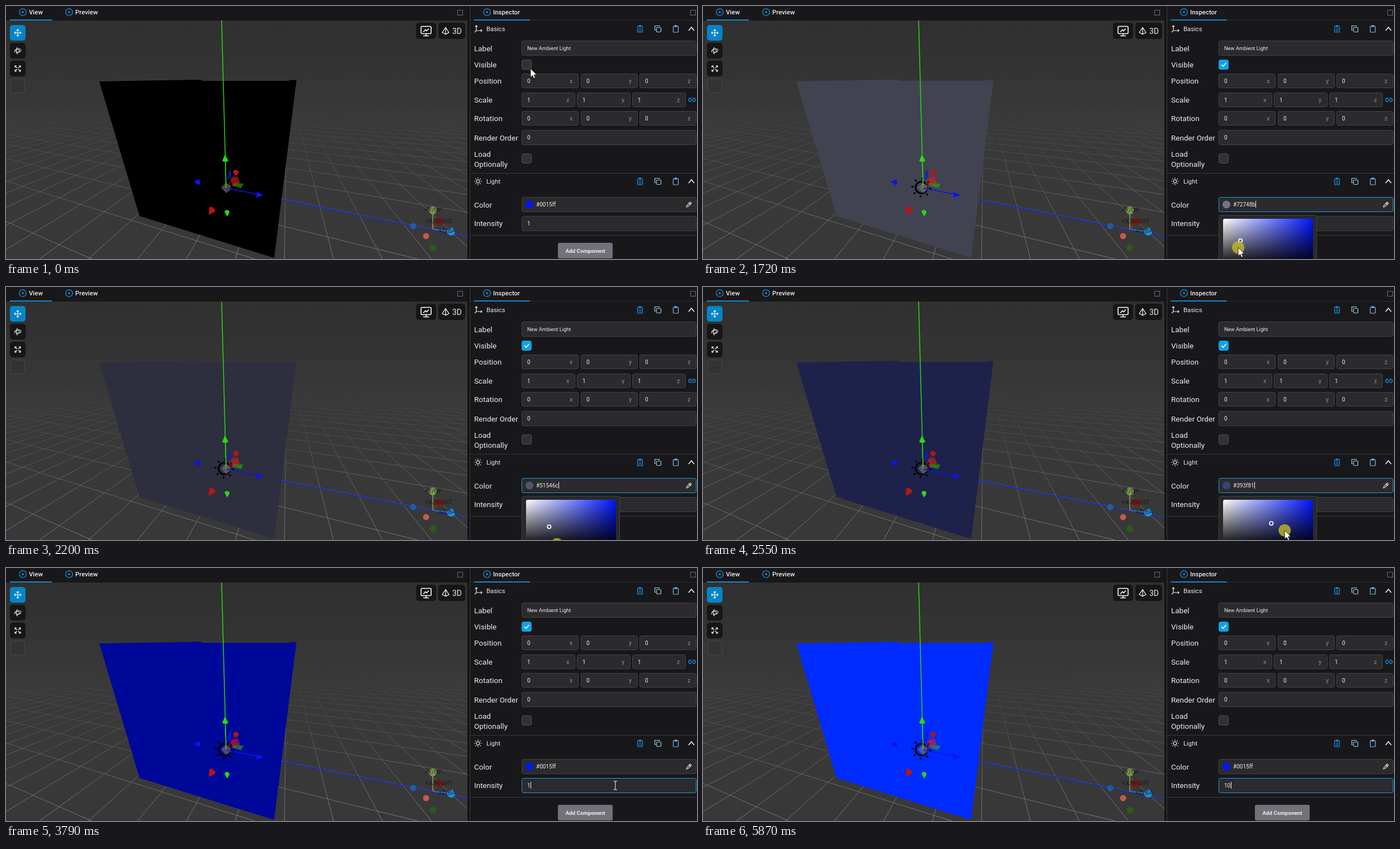
An HTML page for the animation above (5.94 s loop, 1237 by 453 pixels).

```html
<!DOCTYPE html>
<html lang="en">
<head>
<meta charset="utf-8">
<title>Ambient light inspector</title>
<style>
  html, body { margin: 0; width: 100%; height: 100%; overflow: hidden; background: #18181b; }
  svg { display: block; width: 1237px; height: 453px; }
  text { font-family: Roboto, Inter, sans-serif; fill: #ececee; }
</style>
</head>
<body>
<svg id="stage" viewBox="0 0 1237 453" fill="none"></svg>
<script>
const LOOP = 5940;
const stage = document.getElementById('stage');

// ---- drawing helpers -------------------------------------------------
const rect = (x, y, w, h, fill, r = 0, more = '') =>
  `<rect x="${x}" y="${y}" width="${w}" height="${h}" rx="${r}" fill="${fill}" ${more}/>`;
const text = (x, y, s, size, more = '') =>
  `<text x="${x}" y="${y}" font-size="${size}" ${more}>${s}</text>`;
const path = (d, stroke, w = 1, more = '') =>
  `<path d="${d}" stroke="${stroke}" stroke-width="${w}" ${more}/>`;
const shape = (points, fill, more = '') => `<polygon points="${points}" fill="${fill}" ${more}/>`;
const dot = (x, y, r, fill, more = '') => `<circle cx="${x}" cy="${y}" r="${r}" fill="${fill}" ${more}/>`;
const at = (x, y, s) => `<g transform="translate(${x} ${y})">${s}</g>`;

// ---- viewport --------------------------------------------------------
// Ground plane seen in perspective: an origin and two vanishing points.
const ORIGIN = [394, 326], VX = [503, 131], VZ = [-581, 131];
const STEP_X = 0.163, STEP_Z = 0.049;

function ground(u, w) {
  const a = u * STEP_X, b = w * STEP_Z, d = 1 + a + b;
  return [0, 1].map(i => ((ORIGIN[i] + a * VX[i] + b * VZ[i]) / d).toFixed(1)).join(' ');
}

function grid() {
  let d = '';
  for (let u = -8; u <= 50; u++) {
    d += `M${ground(u, (0.05 - 1 - u * STEP_X) / STEP_Z)}L${ground(u, 4000)}`;
  }
  for (let w = -110; w <= 90; w++) {
    d += `M${ground((0.05 - 1 - w * STEP_Z) / STEP_X, w)}L${ground(2000, w)}`;
  }
  return path(d, '#8a8a8a', 1, 'mask="url(#fade)"');
}

function sun() {
  let rays = '';
  for (let i = 0; i < 8; i++) {
    const c = Math.cos(i * Math.PI / 4 + 0.1), s = Math.sin(i * Math.PI / 4 + 0.1);
    rays += `M${14 * c} ${14 * s}L${18 * c} ${18 * s}`;
  }
  return at(391, 325, dot(0, 0, 10.5, 'none', 'stroke="#050505" stroke-width="3.2"') + path(rays, '#050505', 3));
}

const gizmo = () =>
  path('M386 26L394 326', '#2bd80f', 1.5) +
  path('M492 346.5L826 413', '#0a1e9c', 1.4) +
  path('M492 346.5L826 413', '#1030ff', 1.4, 'stroke-dasharray="5 2"') +
  shape('385,325 393,317 402,321 402,329 394,335', '#777', 'opacity=".6"') +
  shape('398,297 403,292 403,307 397,312', '#1515e0', 'opacity=".7"') +
  shape('408,317 425,318 421,326 405,322', '#1fb312', 'opacity=".6"') +
  shape('402,309 414,305 419,316 406,323', '#e02018', 'opacity=".6"') +
  path('M394 326L412 299', '#c41414', 1.3) +
  path('M394 326L450 337', '#0a14f0', 1.5) +
  path('M394 326L392.500 277', '#2bd80f', 1.3) +
  shape('392,266 387,277 390,279 395,279 398,277', '#2bd80f') +
  shape('406,296 412,293 417,297 414,303 409,302', '#b91414') +
  shape('449,333 461,339 448,343', '#0a14f0') +
  shape('336,315 346,310 348,317 345,321', '#0a14f0') +
  shape('364,361 368,359 375,365 373,369 363,374', '#b91414') +
  shape('391,368 394,365 399,366 400,370 396,377', '#2bd80f');

const compass = () =>
  path('M764 372V400', '#84a24e', 1.6) + path('M764 400L774 387', '#9a2f28', 1.5) +
  path('M764 400L792 403', '#1e88d8', 1.6) +
  dot(729, 394, 5.5, '#205ca5') + dot(752, 412, 5.5, '#c95650') + dot(764, 433, 6, '#2c5a1c') +
  dot(764, 366, 7, '#76994a') + rect(768, 380, 14, 12, '#7c1a15', 3) + dot(797, 404, 7, '#1f8fdd') +
  [[749, 369, '+Y/UP'], [750, 389, '+X/RIGHT'], [774, 406, '+Z/BA']]
    .map(([x, y, s]) => text(x, y, s, 11, 'style="fill:#151515" opacity=".85"')).join('');

const tool = (x, y, w, h, fill, icon) => rect(x, y, w, h, fill, 5) + at(x + w / 2, y + h / 2, icon);

const tools = () =>
  tool(7, 34, 28, 28, '#0584c8', path('M-6 0H6M0-6V6M-6 0l2-2M-6 0l2 2M6 0l-2-2M6 0l-2 2M0-6l-2 2M0-6l2 2M0 6l-2-2M0 6l2-2', '#fff', 1.1)) +
  tool(7, 66, 28, 28, '#161616', dot(0, 0, 3, 'none', 'stroke="#eee"') +
    path('M-5 3C-9-2 5-6 6-1C6 2 1 3-1 3M0-6C-4-4-3 5 0 6', '#eee', 1.1)) +
  tool(7, 98, 28, 28, '#161616', path('M-5-2V-5H-2M2-5H5V-2M5 2V5H2M-2 5H-5V2M-5-5L-1-1M5-5L1-1M5 5L1 1M-5 5L-1 1', '#eee', 1.2)) +
  rect(8.5, 130.5, 25, 25, '#333', 3, 'stroke="#484848"') +
  tool(734, 30, 36, 29, '#161616', rect(-9, -8, 18, 13, 'none', 2, 'stroke="#fff" stroke-width="1.6"') +
    path('M-5 9H5M0 5V9M-5 2L-1-2L1 0L5-4', '#fff', 1.6)) +
  tool(774, 30, 48, 29, '#161616', path('M-11-6L-17 3L-11 6L-5 3ZM-11-6V6', '#fff', 1.2) +
    text(1, 5, '3D', 14));

const tab = (x, label) =>
  dot(x, 11, 6.2, 'none', 'stroke="#1c94e0" stroke-width="1.3"') + dot(x, 11, 1.8, '#1c94e0') +
  text(x + 11, 15, label, 11.4, 'font-weight="500"');
const windowBox = x => rect(x + .5, 7.5, 9, 9, 'none', 0, 'stroke="#6d6d72"');

const viewport = () =>
  rect(0, 26, 826, 106, 'url(#sky)') + rect(0, 131, 826, 322, 'url(#floor)') +
  `<g clip-path="url(#view)">${grid()}
    <polygon id="cube" points="167,135 349,132 351,134 505,134 510,132.500 520,132.500 480,451 239,376"/>
    <g id="sun">${sun()}</g>${gizmo()}${compass()}</g>` + tools() +
  tab(30, 'View') + tab(113, 'Preview') + windowBox(808) + rect(7, 24, 75, 2, '#1487cc') +
  rect(826, 0, 5, 453, '#141416') + rect(830, 0, 1, 453, '#3c3c41');

// ---- inspector -------------------------------------------------------
const fields = [];
function field(x, y, w, h, id = '') {
  fields.push([x, y, w, h]);
  return rect(x + .5, y + .5, w - 1, h - 1, '#2b2b2d', 3, `stroke="#434347" ${id && `id="${id}"`}`);
}
const label = (y, s) => text(838, y, s, 13.5);
const value = (x, y, s, id = '') => text(x, y, s, 10, id && `id="${id}"`);

function vector(y, name, v, step, w) {
  let s = label(y + 18, name);
  ['x', 'y', 'z'].forEach((axis, i) => {
    const x = 923 + Math.round(i * step);
    s += field(x, y, w, 26) + value(x + 10, y + 16.5, v) +
      text(x + w - 16, y + 16.5, axis, 11, 'style="fill:#8b8b90"');
  });
  return s;
}

const board = color => rect(-4.5, -5, 9, 11, 'none', 1, `stroke="${color}" stroke-width="1.2"`) +
  rect(-2.5, -6.5, 5, 3, color, 1);
const section = (y, name) =>
  text(860, y + 4, name, 11.3) +
  at(1135, y, board('#1d8fe6') + path('M-2.500-1H2.500M-2.500 1.500H2.500M-2.500 4H2.500', '#1d8fe6')) +
  at(1167, y, rect(-2.5, -2.5, 8, 8, 'none', 1.5, 'stroke="#9ed0ee" stroke-width="1.2"') +
    path('M-4 2.500H-5.500V-5.500H2.500V-4', '#9ed0ee', 1.2)) +
  at(1199, y, board('#78bde4')) + at(1227, y, path('M-5 3L0-3L5 3', '#f2f2f2', 1.6));

function lamp() {
  let rays = '';
  for (let i = 0; i < 8; i++) {
    const c = Math.cos(i * Math.PI / 4), s = Math.sin(i * Math.PI / 4);
    rays += `M${4.8 * c} ${4.8 * s}L${6.8 * c} ${6.8 * s}`;
  }
  return dot(0, 0, 2.8, 'none', 'stroke="#eee" stroke-width="1.2"') + path(rays, '#eee', 1.2);
}

const inspector = () =>
  tab(861, 'Inspector') + windowBox(1225) + rect(831, 25, 406, 1, '#2b2b2f') + rect(838, 24, 100, 2, '#1487cc') +
  at(845, 41, path('M-3-6V3H7M-5-4L-3-6L-1-4M5 1L7 3L5 5M-3 3L-6 6', '#eee', 1.2)) + section(41, 'Basics') +
  label(81, 'Label') + field(923, 62, 313, 27) + text(933, 79, 'New Ambient Light', 9.25) +
  label(110, 'Visible') + rect(923.5, 96.5, 17, 17, '#323234', 3, 'stroke="#515155" id="visible"') +
  path('M928 105L931 108L936.500 102', '#fff', 1.6, 'id="tick"') +
  vector(121, 'Position', '0', 105.5, 102) + vector(155, 'Scale', '1', 99, 96) +
  at(1228, 168, path('M-1-3H-3A3 3 0 0 0-3 3H-1M1-3H3A3 3 0 0 1 3 3H1M-3 0H3', '#1d8fe6', 1.3)) +
  vector(188, 'Rotation', '0', 105.5, 102) +
  label(241, 'Render Order') + field(923, 222, 313, 27) + value(933, 239, '0') +
  label(270, 'Load') + label(288, 'Optionally') + rect(923.5, 264.5, 17, 17, '#323234', 3, 'stroke="#515155"') +
  rect(831, 299, 406, 1, '#38383c') + at(845, 314, lamp()) + section(314, 'Light') +
  label(361, 'Color') + field(923, 342, 313, 27, 'colorField') + dot(937, 355.5, 7, '#0015ff', 'id="swatch"') +
  value(949, 359, '', 'hex') +
  at(1222, 356, path('M-4 4L-3 1L1-3L3-1L-1 3ZM0-4L4 0M1-3L3-5L5-3L3-1', '#e4e4e4', 1.1)) +
  label(394, 'Intensity') + field(923, 376, 313, 27, 'levelField') + value(933, 393, '', 'level') +
  rect(831, 410, 406, 1, '#38383c') + rect(988, 424, 98, 28, '#72727b', 3) +
  text(1037, 441.5, 'Add Component', 9.8, 'font-weight="700" text-anchor="middle"') +
  `<g id="picker">${rect(923.5, 374.5, 175, 90, '#29292b', 3, 'stroke="#404044"')}
    ${rect(931, 381, 161, 85, 'url(#hue)', 3)}${rect(931, 381, 161, 85, 'url(#shade)', 3)}
    <circle id="handle" r="3.200" stroke="#fff" stroke-width="1.700"/></g>` +
  rect(0, 0, 1, 12, '#f4f4f4', 0, 'id="caret"');

const stop = (offset, color, opacity = 1) =>
  `<stop offset="${offset}" stop-color="${color}" stop-opacity="${opacity}"/>`;
const ramp = (id, dir, stops) => `<linearGradient id="${id}" x1="0" y1="0" ${dir}>${stops}</linearGradient>`;
const across = 'x2="1" y2="0"', down = 'x2="0" y2="1"';

stage.innerHTML = `<defs>
  ${ramp('sky', down, stop(0, '#303030') + stop(1, '#343434'))}
  ${ramp('floor', down, stop(0, '#363636') + stop(.3, '#393939') + stop(1, '#383838'))}
  ${ramp('hue', across, stop(0, '#fff') + stop(1, '#0015ff'))}
  ${ramp('shade', down, stop(0, '#000', 0) + stop(1, '#000'))}
  ${ramp('depth', down, stop(.14, '#000') + stop(.45, '#444') + stop(1, '#ccc'))}
  <mask id="fade" maskUnits="userSpaceOnUse" x="0" y="131" width="826" height="322">${rect(0, 131, 826, 322, 'url(#depth)')}</mask>
  <clipPath id="view">${rect(0, 26, 826, 427, '#fff')}</clipPath></defs>` +
  rect(0, 0, 1237, 453, '#18181b') + viewport() + inspector() +
  dot(0, 0, 11, '#c4bd22', 'opacity=".78" id="press"') +
  `<path id="arrow" d="M0 0V15.500L3.600 12.200L6 17.500L8.600 16.300L6.200 11.200H11Z" fill="#fff" stroke="#111" stroke-width=".8"/>
   <path id="beam" d="M-3-7.500H-1L0-6.500L1-7.500H3M0-6.500V6.500M-3 7.500H-1L0 6.500L1 7.500H3" stroke="#e8e8e8" stroke-width="1.100"/>`;

// ---- motion ----------------------------------------------------------
const el = {};
stage.querySelectorAll('[id]').forEach(n => el[n.id] = n);
const set = (n, attrs) => { for (const k in attrs) n.setAttribute(k, attrs[k]); };
const show = (n, on) => n.setAttribute('visibility', on ? 'visible' : 'hidden');
const within = (t, a, b) => t >= a && t < b;

// [time, x, y]
const POINTER = [
  [0, 939, 112], [690, 939, 112], [820, 946, 150], [980, 980, 310], [1100, 992, 362], [1230, 992, 362],
  [1300, 994, 364], [1500, 1005, 405], [1750, 952, 436], [1920, 965, 452], [2250, 990, 462],
  [2550, 1041, 436], [2700, 1085, 402], [2840, 1112, 384], [2910, 1119, 381], [3110, 1119, 381],
  [3300, 1115, 392], [3660, 1115, 392], [3720, 1152, 391], [3850, 1040, 388], [4020, 850, 383],
  [4130, 794, 380], [5540, 794, 380], [5700, 815, 415], [5860, 850, 462], [LOOP, 850, 462]
];
// [time, saturation, value]
const PICKED = [
  [0, 1, 255], [1499, 1, 255], [1500, .45, 190], [1750, .14, 132], [1920, .125, 120], [2250, .27, 106],
  [2550, 71 / 128, 128], [2700, .88, 205], [2840, 1, 255], [LOOP, 1, 255]
];

function sample(keys, t) {
  const i = Math.max(1, keys.findIndex(k => k[0] > t));
  const a = keys[i - 1], b = keys[i], p = (t - a[0]) / (b[0] - a[0]);
  return [1, 2].map(j => a[j] + (b[j] - a[j]) * p);
}

function pickedColor(s, v) {
  const low = Math.round(v * (1 - s));
  return [low, Math.ceil(low + (v - low) * 21 / 255 - .1), Math.round(v)];
}

// Ambient light on a white surface, in linear colour.
function lit(channel, level) {
  const c = channel / 255;
  const lin = (c <= .04045 ? c / 12.92 : ((c + .055) / 1.055) ** 2.4) * level / Math.PI;
  const out = lin <= .0031308 ? lin * 12.92 : 1.055 * lin ** (1 / 2.4) - .055;
  return Math.round(255 * Math.min(1, out));
}

function draw(t) {
  const on = t >= 270, level = t >= 4790 ? 10 : 1;
  const open = within(t, 1300, 3320), typing = t >= 3320;
  const [s, v] = sample(PICKED, t), [x, y] = sample(POINTER, t);
  const rgb = pickedColor(s, v);

  el.cube.setAttribute('fill', on ? `rgb(${rgb.map(c => lit(c, level))})` : '#000');
  show(el.sun, on);
  set(el.visible, { fill: on ? '#10a2e6' : '#323234', stroke: on ? '#10a2e6' : '#515155' });
  show(el.tick, on);

  el.hex.textContent = '#' + rgb.map(c => c.toString(16).padStart(2, '0')).join('');
  el.level.textContent = level;
  el.swatch.setAttribute('fill', `rgb(${rgb})`);
  el.colorField.setAttribute('stroke', open ? '#1c9be0' : '#434347');
  el.levelField.setAttribute('stroke', typing ? '#1c9be0' : '#434347');
  show(el.picker, open);
  set(el.handle, { cx: 938 + 134.3 * s + 14.7 * s * s, cy: 385 + (1 - v / 255) * 77 });

  const label = typing ? el.level : el.hex;
  set(el.caret, {
    x: Math.round(+label.getAttribute('x') + label.getComputedTextLength() + .5),
    y: typing ? 383 : 349
  });
  show(el.caret, (open || typing) && !within(t, 4130, 4660) && !within(t, 5320, 5850));

  const overField = !(open && x < 1099) &&
    fields.some(([fx, fy, w, h]) => x >= fx && x < fx + w && y >= fy && y < fy + h);
  const move = { transform: `translate(${x.toFixed(1)} ${y.toFixed(1)})` };
  [el.arrow, el.beam, el.press].forEach(n => set(n, move));
  show(el.arrow, !overField);
  show(el.beam, overField);
  show(el.press, within(t, 70, 480) || within(t, 1230, 1400) || within(t, 1490, 2840) || within(t, 3250, 3510));
}

const start = performance.now();
function tick() {
  draw((performance.now() - start) % LOOP);
  requestAnimationFrame(tick);
}
tick();
</script>
</body>
</html>
```
